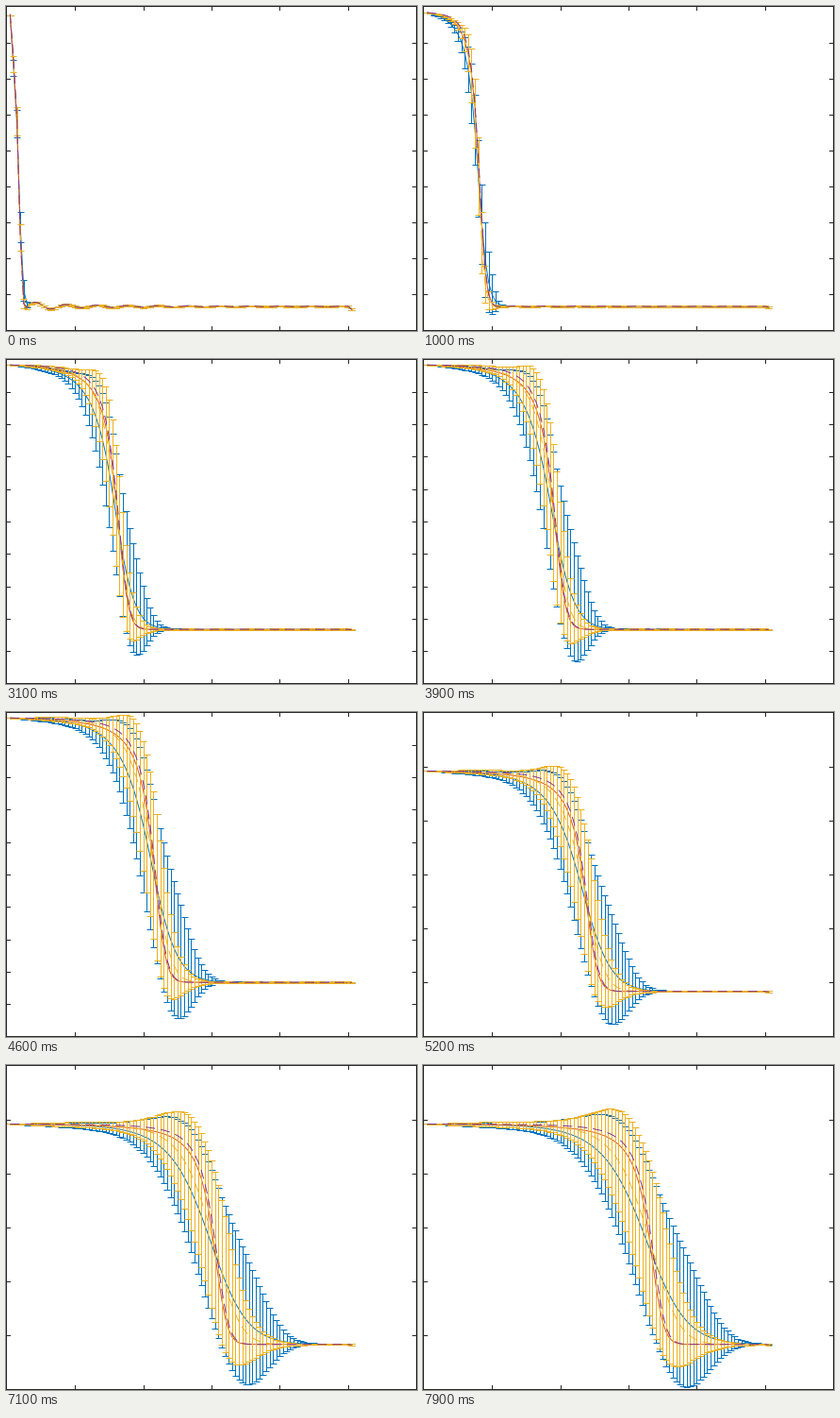
Recreate the animation shown at these times as a matplotlib script. Size 436x344 px, loop 8000 ms.

```python
import numpy as np
import matplotlib.pyplot as plt
from matplotlib.animation import FuncAnimation
from matplotlib.collections import LineCollection

W, H, DPI = 436, 344, 100
R, B = W - 1, H - 1
FRAMES, INTERVAL = 80, 100
BLUE, RED, YELLOW, PURPLE = "#0072BD", "#D95319", "#EDB120", "#7E2F8E"
INK = "#262626"
TOP, BASE = 9.83, 1.67
LEFT, STEP = 0.3, 72.43
CAP, TICK = 3.5, 4

x = LEFT + STEP / 20 * np.arange(1, 102)


def px(n):
    """Pixels to points."""
    return n * 72 / DPI


def limits(t):
    """Axis range and tick step; the range widens when the bars reach it."""
    if t < 30:
        return 1, 10, 1
    if t < 50:
        return 0, 10, 1
    return 0, 12, 2


def settle(t, tau=6):
    return 1 - np.exp(-t / tau)


def centre(t):
    return 35.2 + 2.567 * t - 22.7 * np.exp(-t / 6)


def ripple(t):
    r = 0.125 * (30 / x) ** 1.1 * np.cos(2 * np.pi * (x - 64) / 32.5)
    r[-1] -= 0.08
    return r * (0.15 + 0.85 * np.exp(-t / 6))


def front(t, c, width, tail, bend):
    """Falling front: power-law shoulder on the left, sharper foot on the right."""
    d = (x - c) / width
    left = -tail * np.log1p(np.abs(d) / tail)
    right = d * (1 + bend * d)
    drop = 1 / (1 + np.exp(-np.clip(np.where(d < 0, left, right), -60, 60)))
    pin = np.exp(-(x - x[0]) / (0.5 + 40 * settle(t)))
    drop = drop * (1 - (1 - drop) * pin)
    return TOP - (TOP - BASE) * drop + ripple(t) * drop ** 8


def spread(t, c, wl, wr, power):
    """Half length of the error bars: a lopsided bell with a long left tail."""
    d = x - c
    left = 0.92 * np.exp(-(d / wl) ** 2) + 0.08 * np.exp(-np.abs(d) / (4 * wl))
    right = np.exp(-(np.maximum(d, 0) / wr) ** power)
    amp = 0.05 + 0.31 * (t / 79) ** 0.37
    pin = 1 - np.exp(-(x - x[0]) / (1 + 60 * settle(t)))
    return ((TOP - BASE) * amp * np.where(d < 0, left, right) + 0.02) * pin


def segments(x0, y0, x1, y1):
    a = np.column_stack(np.broadcast_arrays(x0, y0))
    b = np.column_stack(np.broadcast_arrays(x1, y1))
    return np.stack([a, b], axis=1)


fig = plt.figure(figsize=(W / DPI, H / DPI), dpi=DPI, facecolor="white")
ax = fig.add_axes([0, 0, 1, 1])
# Just under half a pixel, so that snapping lands on the intended pixel.
ax.set_xlim(-0.45, W - 0.45)
ax.set_ylim(H - 0.45, -0.45)
ax.axis("off")


def crisp(color, z, cap="butt"):
    lines = LineCollection([], colors=color, linewidths=px(1), zorder=z)
    lines.set_snap(True)
    lines.set_capstyle(cap)
    ax.add_collection(lines, autolim=False)
    return lines


class Series:
    def __init__(self, color, z, bars=False, dashed=False):
        lw = 0.95
        style = (0, (10 / lw, 6 / lw)) if dashed else "-"
        self.line, = ax.plot([], [], color=color, lw=px(lw), ls=style,
                             dash_capstyle="butt", zorder=z + 0.5)
        if bars:
            self.stems, self.caps = crisp(color, z), crisp(color, z)

    def draw(self, to_y, mean, dev=None):
        self.line.set_data(x, to_y(mean))
        if dev is None:
            return
        hi, lo = to_y(mean + dev), to_y(mean - dev)
        self.stems.set_segments(segments(x, hi, x, lo))
        self.caps.set_segments(np.concatenate(
            [segments(x - CAP, y, x + CAP, y) for y in (hi, lo)]))


blue = Series(BLUE, 2, bars=True)
red = Series(RED, 3)
yellow = Series(YELLOW, 4, bars=True, dashed=True)
purple = Series(PURPLE, 5, dashed=True)

box, ticks = crisp(INK, 1, "projecting"), crisp(INK, 1, "projecting")
box.set_segments([[(0, 0), (R, 0)], [(0, B), (R, B)],
                  [(0, 0), (0, B)], [(R, 0), (R, B)]])


def update(t):
    lo, hi, step = limits(t)

    def to_y(v):
        return B * (hi - v) / (hi - lo)

    tx = LEFT + STEP * np.arange(1, 6)
    ty = to_y(np.arange(lo + step, hi, step))
    ticks.set_segments(np.concatenate([
        segments(tx, 0, tx, TICK), segments(tx, B - TICK, tx, B),
        segments(0, ty, TICK, ty), segments(R - TICK, ty, R, ty)]))

    c, grow = centre(t), settle(t)
    wb, wy = 2.4 + 0.43 * t ** 0.88, 2.2 + 0.2 * t
    wr = 2.2 + 6.3 * settle(t, 20)
    cb = c - 0.18 * wb * grow
    tail = 2.2 + 0.0013 * t ** 2

    blue.draw(to_y, front(t, cb, wb, tail, 0.03),
              spread(t, cb + 0.45 * wb, 2.95 * wb, 2.75 * wb, 3))
    red.draw(to_y, front(t, c + grow, wr, 2.35, 0.13))
    yellow.draw(to_y, front(t, c, wy, tail, 0.12),
                spread(t, c + 0.4 * wy, 3.2 * wy, 1.95 * wy, 1.65))
    purple.draw(to_y, front(t, c + grow * (1 + 0.025 * t), wr, 3.2, 0.13))
    return []


anim = FuncAnimation(fig, update, frames=FRAMES, interval=INTERVAL,
                     repeat=True, repeat_delay=0, blit=False)
plt.show()
```
